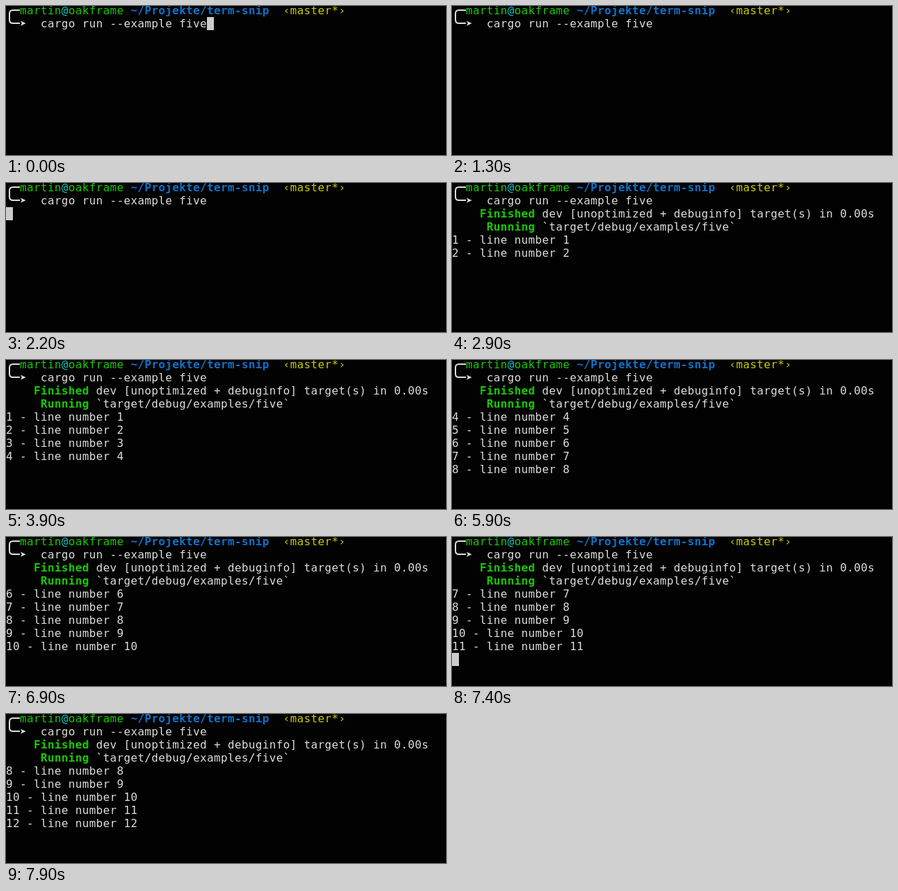
An HTML page that plays this animation: 635x216 px, repeating every 8000 ms.

```html
<!DOCTYPE html>
<html lang="en">
<head>
<meta charset="utf-8">
<title>Terminal snippet</title>
<style>
  html, body { margin: 0; width: 100%; height: 100%; overflow: hidden; background: #020202; }
  #terminal {
    position: relative; width: 635px; height: 216px; overflow: hidden; color: #ddd;
    font: 16px/19px "DejaVu Sans Mono", monospace;
    letter-spacing: calc(10px - 1ch); /* snap glyphs to 10px cells */
    font-variant-ligatures: none;
  }
  pre { position: absolute; left: 0; top: -3px; margin: 0; font: inherit; }
  svg { position: absolute; left: 0; top: 0; }
  #cursor { position: absolute; width: 10px; height: 19px; background: #ccc; }
  .green { color: #19cb00; }
  .cyan { color: #0dcdcd; }
  .blue { color: #0d73cc; }
  .yellow { color: #cecb00; }
  b { font-weight: bold; }
</style>
</head>
<body>
<div id="terminal">
  <svg width="20" height="35" fill="none" stroke="#ddd" stroke-width="2">
    <path d="M20 6H10Q5 6 5 11V20Q5 25 10 25H20"/>
  </svg>
  <pre><span class="green">  martin</span><span class="cyan">@</span><span class="green">oakframe</span> <b class="blue">~/Projekte/term-snip</b>  <span class="yellow">‹master*›</span>
  ➤  cargo run --example five
<span id="build"><b class="green">    Finished</b> dev [unoptimized + debuginfo] target(s) in 0.00s
<b class="green">     Running</b> `target/debug/examples/five`
<span id="output"></span></span></pre>
  <div id="cursor"></div>
</div>
<script>
const LOOP = 8000, ENTER = 2200, START = 2300, SECOND_LINE = 2900, STEP = 500;
const VISIBLE_LINES = 5;
const build = document.getElementById("build");
const output = document.getElementById("output");
const cursor = document.getElementById("cursor");

function placeCursor(column, row, visible) {
  cursor.style.left = column * 10 + "px";
  cursor.style.top = row * 19 - 3 + "px";
  cursor.style.visibility = visible ? "visible" : "hidden";
}

function render(time) {
  const running = time >= START;
  build.style.visibility = running ? "visible" : "hidden";

  if (!running) {
    const entered = time >= ENTER;
    const blinkOn = Math.floor((time + 200) / STEP) % 2 === 0;
    placeCursor(entered ? 0 : 29, entered ? 2 : 1, entered || blinkOn);
    output.textContent = "";
    return;
  }

  // One line per step; only the newest lines stay on screen.
  const last = time < SECOND_LINE ? 1 : 2 + Math.floor((time - SECOND_LINE) / STEP);
  const count = Math.min(last, VISIBLE_LINES);
  output.textContent = Array.from({ length: count }, (_, i) => {
    const number = last - count + 1 + i;
    return `${number} - line number ${number}`;
  }).join("\n");
  placeCursor(0, 4 + count, last % 2 === 1);
}

const start = performance.now();
function tick() {
  render((performance.now() - start) % LOOP);
  requestAnimationFrame(tick);
}
tick();
</script>
</body>
</html>
```
